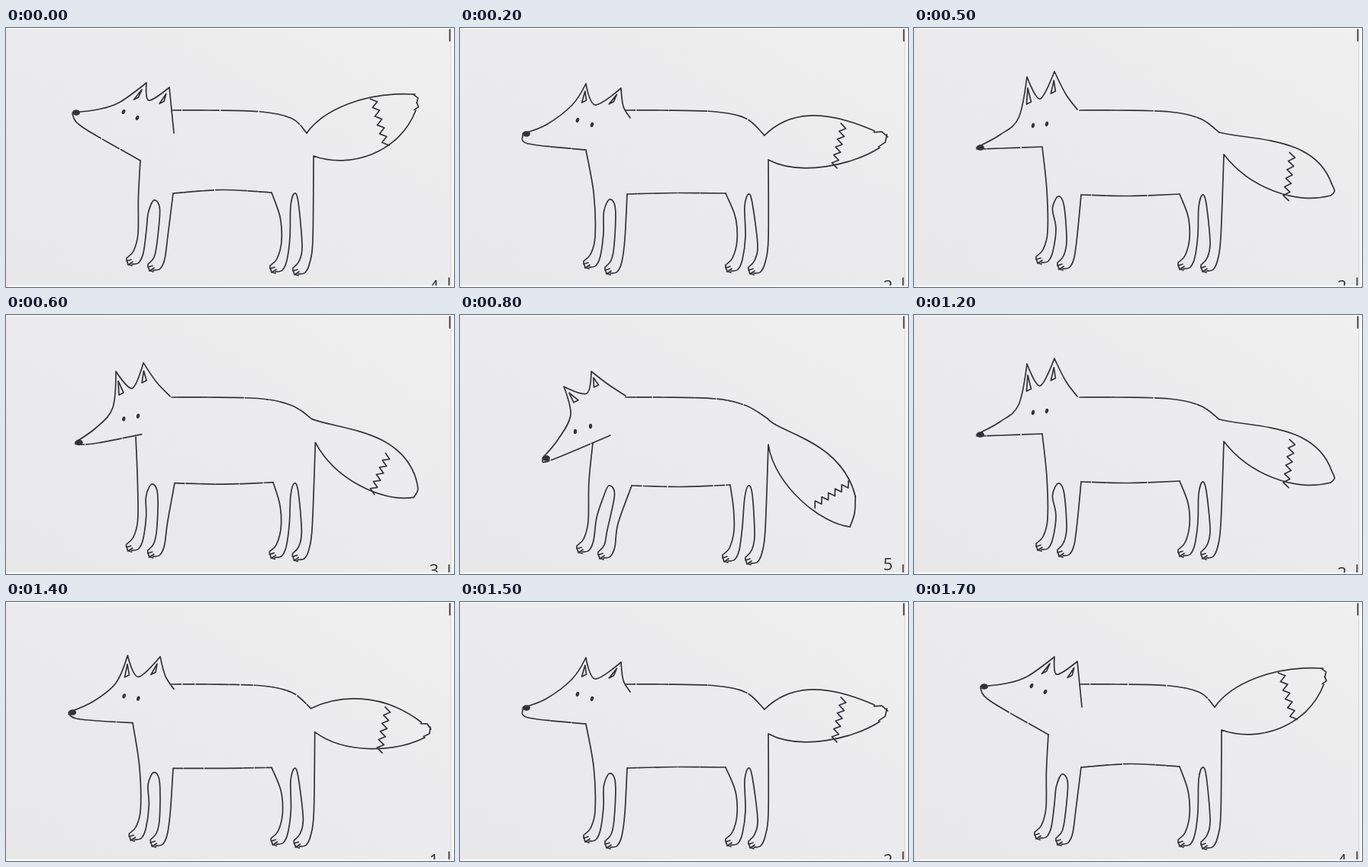
Animation, 587 px wide and 340 px high, one loop 1800 ms. Source, as an HTML page:

```html
<!DOCTYPE html>
<html lang="en">
<head>
<meta charset="utf-8">
<title>Fox wagging its tail</title>
<style>
  html, body { margin: 0; width: 100%; height: 100%; overflow: hidden; background: #fff; }
  svg { display: block; width: 587px; height: 340px; }
  .ink { fill: none; stroke: #333238; stroke-width: 1.7; stroke-linecap: round; stroke-linejoin: round; }
  .blot { fill: #333238; }
  text { font: 22px "Open Sans", sans-serif; text-anchor: end; }
</style>
</head>
<body>
<svg viewBox="0 0 587 340">
  <defs>
    <linearGradient id="paper" y1="1" x2="1" y2="0">
      <stop offset="0" stop-color="#e8e7e9"/>
      <stop offset=".5" stop-color="#ebeaec"/>
      <stop offset="1" stop-color="#f1f0f0"/>
    </linearGradient>
    <clipPath id="sheet"><rect y="1" width="585" height="337"/></clipPath>
  </defs>
  <g id="page" clip-path="url(#sheet)">
    <rect width="585" height="340" fill="url(#paper)"/>
    <path d="M582.5 0V340" stroke="#dddcde"/>
    <path class="ink" d="M581.5 2V17M580.5 328V338"/>
  </g>
</svg>
<script>
// Landmarks of the key drawings:
// head: nose, muzzle, brow, ear tip, valley, ear tip, nape, neck
// legs: chest, fore foot, fore arch, elbow, hind foot
// tail: top curve, point, under curve
const poses = [
  { at: 0,
    head: '87,111 120,107 148,98 184,72 187,95 214,78 217,108 220,138',
    jaw: '87,113 100,130 176,174',
    legs: '176,174 158,302 194,226 219,217 346,312',
    tail: '394,138 415,108 470,83 536,87 540,98 537,108 515,165 450,185 403,168',
    stripe: '481,92 498,155', eyes: '154,110 172,118' },
  { at: 2,
    head: '82,139 113,127 147,101 165,73 177,101 211,79 214,103 223,118',
    jaw: '82,141 90,152 165,160',
    legs: '165,160 162,306 196,225 219,218 348,311',
    tail: '399,141 430,110 475,105 543,135 561,141 550,157 515,180 445,195 404,173',
    stripe: '503,126 490,183', eyes: '154,121 173,127' },
  { at: 5,
    head: '82,157 113,140 137,118 148,64 165,93 184,57 199,87 214,107',
    jaw: '82,159 112,158 168,156',
    legs: '168,156 160,300 189,221 219,219 346,308',
    tail: '400,137 445,148 525,142 547,204 551,214 546,220 500,232 440,210 406,166',
    stripe: '496,164 487,226', eyes: '156,128 174,126' },
  { at: 8,
    head: '108,188 128,164 145,131 136,94 166,103 172,74 194,91 217,106',
    jaw: '108,190 118,191 197,158',
    legs: '174,168 153,303 195,224 225,224 344,315',
    tail: '403,136 418,155 500,165 518,238 517,260 511,278 475,275 412,225 404,170',
    stripe: '511,221 463,250', eyes: '151,153 171,146' }
];
const parts = ['head', 'jaw', 'legs', 'tail', 'stripe', 'eyes'];
for (const pose of poses)
  for (const part of parts)
    pose[part] = pose[part].split(' ').map(p => p.split(',').map(Number));

const page = document.getElementById('page');
function add(tag, cls) {
  const el = document.createElementNS('http://www.w3.org/2000/svg', tag);
  el.setAttribute('class', cls);
  return page.appendChild(el);
}
const set = (el, attrs) => {
  for (const name in attrs) el.setAttribute(name, attrs[name]);
};

const mix = (a, b, k) => a + (b - a) * k;
const lerp = (p, q, k) => [mix(p[0], q[0], k), mix(p[1], q[1], k)];
const off = (p, x, y) => [p[0] + x, p[1] + y];
const line = pts => 'M' + pts.join('L');

// Smooth curve through the points, with corners at the sharp indices
function curve(pts, sharp = []) {
  const last = pts.length - 1;
  const slope = i => {
    if (sharp.includes(i)) return [0, 0];
    const a = pts[Math.max(i - 1, 0)], b = pts[Math.min(i + 1, last)];
    return [(b[0] - a[0]) / 6, (b[1] - a[1]) / 6];
  };
  let d = 'M' + pts[0];
  for (let i = 0; i < last; i++) {
    const u = slope(i), v = slope(i + 1);
    d += `C${off(pts[i], ...u)} ${off(pts[i + 1], -v[0], -v[1])} ${pts[i + 1]}`;
  }
  return d;
}

// Zigzag from p to q with the given number of teeth
function zigzag(p, q, count, size) {
  const len = Math.hypot(q[0] - p[0], q[1] - p[1]);
  const nx = (q[1] - p[1]) / len, ny = (p[0] - q[0]) / len;
  return line(Array.from({ length: count + 1 }, (_, i) => {
    const s = i % 2 ? size : -size;
    return off(lerp(p, q, i / count), nx * s, ny * s);
  }));
}

// Inner triangle of an ear
function innerEar(left, tip, right) {
  const base = lerp(left, right, 0.5);
  const top = lerp(tip, base, 0.36), low = lerp(tip, base, 0.82);
  return line([off(low, -3, 2), top, off(low, 3, -1)]) + 'Z';
}

// Two legs joined by an arch
function legPair(top, foot, arch, half, gap, end) {
  const foot2 = off(foot, ...gap), knee = off(foot, 15, -32);
  const front = [top, [mix(top[0], knee[0], 0.85), mix(top[1], knee[1], 0.5)],
    knee, off(foot, 9, -9), foot];
  const heel = f => [off(f, 7, 8), off(f, 16, 6), off(f, 22, -7), off(f, 26, -37)];
  const inner = [...heel(foot), off(arch, -half, 16), arch, off(arch, half, 12),
    off(foot2, 12, -29), off(foot2, 8, -9), foot2];
  const toes = f => `M${f}l0 4 6 -2m-5 3l1 4 6 -4m-4 4l3 1`;
  return curve(front) + curve(inner) + curve([...heel(foot2), end]) + toes(foot) + toes(foot2);
}

function random(seed) {
  return () => {
    seed = (seed * 16807) % 2147483647;
    return seed / 2147483647;
  };
}

// Dashes of a pen running dry
function dryPen(seed) {
  const rnd = random(seed);
  return Array.from({ length: 8 }, (_, i) => i % 2 ? 1 + rnd() * 2 : 12 + rnd() * 45).join(' ');
}

const outline = add('path', 'ink');
const [jaw, back, belly] = [1, 2, 3].map(() => add('path', 'ink'));
const detail = add('path', 'ink');
const [nose, eyeNear, eyeFar] = [1, 2, 3].map(() => add('ellipse', 'blot'));
const label = add('text', 'blot');

function draw(n) {
  const i = n < 2 ? 0 : n < 5 ? 1 : 2;
  const from = poses[i], to = poses[i + 1];
  const k = (n - from.at) / (to.at - from.at);
  const now = {};
  for (const part of parts) now[part] = from[part].map((p, j) => lerp(p, to[part][j], k));

  const { head, legs, tail, stripe, eyes } = now;
  const [chest, foot, arch, elbow, hindFoot] = legs;
  const groin = off(elbow, 129, -1);
  const [root, a, b, upper, point, lower, c, d, base] = tail;

  set(outline, { d: curve(head, [3, 5])
    + legPair(chest, foot, arch, 7.5, [28, 8], elbow)
    + legPair(groin, hindFoot, [378, groin[1] + 1], 5, [30, 3], base)
    + `M${root}C${a} ${b} ${upper}M${lower}C${c} ${d} ${base}` });
  set(jaw, { d: curve(now.jaw) });
  set(back, { d: curve([[217, 108], [265, 108], [335, 110], [375, 119], root]) });
  const sag = 6 * Math.min(1, n / 4) - 4;
  set(belly, { d: curve([elbow, off(lerp(elbow, groin, 0.5), 0, sag), groin]) });
  [jaw, back, belly].forEach((el, j) => set(el, { 'stroke-dasharray': dryPen(100 + n * 31 + j * 977) }));

  // The tip is ragged while the tail is up
  const ragged = n < 4 ? zigzag(upper, point, 2, 2) + zigzag(point, lower, 2, 2)
    : curve([upper, point, lower]);
  set(detail, { d: ragged + zigzag(...stripe, 11, 4)
    + innerEar(head[2], head[3], head[4]) + innerEar(head[4], head[5], head[6]) });

  set(nose, { cx: head[0][0] + 5, cy: head[0][1], rx: 5, ry: 3.8 });
  [eyeNear, eyeFar].forEach((el, j) => set(el, {
    rx: 2.1, ry: 3.2, transform: `translate(${eyes[j]}) rotate(${25 - n * 3})`
  }));

  label.textContent = n < 4 ? n - 4 : n - 3;
  set(label, { x: 567, y: 347 - 4 * Math.max(0, n - 5) });
}

// Nine drawings, played forth and back, 100 ms each
const start = performance.now();
let shown = -1;
function tick() {
  const step = Math.floor(Math.max(0, performance.now() - start) / 100) % 18;
  const n = step < 9 ? step : 17 - step;
  if (n !== shown) draw(shown = n);
  requestAnimationFrame(tick);
}
tick();
</script>
</body>
</html>
```
